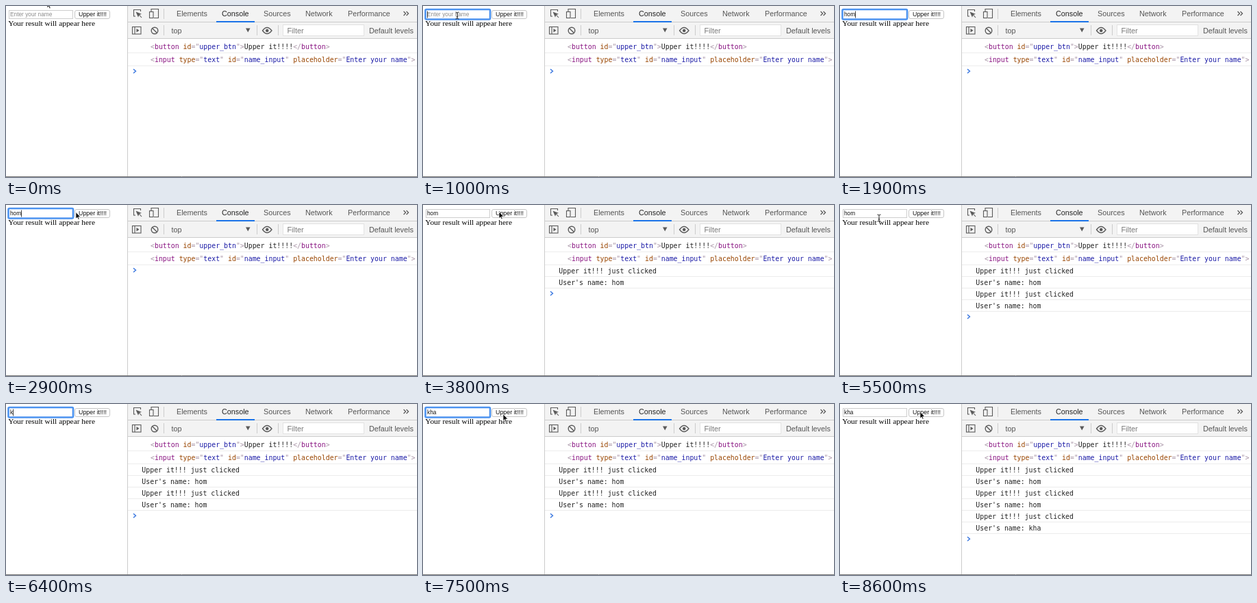
An HTML page that plays this animation: 600 px wide and 250 px high, repeating every 8.7 s.

```html
<!DOCTYPE html>
<html lang="en">
<head>
<meta charset="utf-8">
<title>Console demo</title>
<style>
  html, body { margin: 0; width: 100%; height: 100%; overflow: hidden; background: #fff; }
  svg { display: block; }
  text { white-space: pre; }
  .ui { font: 10.8px "Liberation Sans", Arial, sans-serif; fill: #555; }
  .form { font: 8.3px "Liberation Sans", Arial, sans-serif; fill: #111; }
  .page { font: 11.4px "Liberation Serif", Times, serif; fill: #000; }
  .code { font: 9.9px "DejaVu Sans Mono", monospace; fill: #222; }
  .on { fill: #222; }
  .tag { fill: #881280; }
  .attr { fill: #994500; }
  .val { fill: #1a1aa6; }
  .mark { fill: #a894a6; }
  .icon { fill: none; stroke: #5a5a5a; stroke-width: 1.1; }
  .rule { stroke: #ccc; }
  .row { stroke: #ececec; }
</style>
</head>
<body>
<svg width="600" height="250" viewBox="0 0 600 250">
  <rect width="600" height="250" fill="#fff"/>

  <!-- page -->
  <text class="page" x="3.3" y="29">Your result will appear here</text>
  <rect x="4.5" y="6.5" width="93" height="12" fill="#fff" stroke="#cdcdcd"/>
  <rect id="ring" x="3.5" y="5" width="94.5" height="14.5" rx="1.5" fill="#fff" stroke="#4c93f0" stroke-width="2.6"/>
  <rect id="selection" x="6" y="7.5" height="10" fill="#b3d7ff"/>
  <text id="field" class="form" x="6" y="15.4"></text>
  <rect id="caret" y="7.5" width="0.8" height="10" fill="#111"/>
  <rect x="100.5" y="6.5" width="51" height="12" rx="2.5" fill="#fff" stroke="#c6c6c6"/>
  <text class="form" x="106" y="15.4" style="font-size:8.9px">Upper it!!!!</text>

  <!-- toolbars -->
  <rect x="177" width="423" height="47" fill="#f3f3f3"/>
  <path class="rule" d="M177.5 0V249M177 23.5H600M177 47.5H600M230.5 4V19M230.5 28V43M366.5 28V43M397.5 28V43"/>
  <g class="ui">
    <text x="249" y="15">Elements</text>
    <text x="315" y="15" class="on">Console</text>
    <text x="376" y="15">Sources</text>
    <text x="437" y="15">Network</text>
    <text x="499" y="15">Performance</text>
    <text x="241.5" y="39.5">top</text>
    <text x="530" y="39.5">Default levels</text>
  </g>
  <rect x="307" y="22" width="56" height="2" fill="#1a73e8"/>
  <rect x="404.5" y="27.5" width="118" height="16" fill="#fff" stroke="#e2e2e2"/>
  <text class="ui" x="410.5" y="39.5" style="fill:#777">Filter</text>
  <g class="icon">
    <path d="M189 15H186.5V5.5H196.5V8"/>
    <path d="M189.5 8.5L198 11.8 194.5 13 193 16.5Z" fill="#5a5a5a" stroke="none"/>
    <path d="M194 12.5L198 17"/>
    <path d="M212 8V4.5H222.5V17.5H216"/>
    <rect x="209.5" y="8.5" width="5.5" height="9"/>
    <path d="M580.5 8L583.5 11 580.5 14M584.5 8L587.5 11 584.5 14" stroke-width="1.3"/>
    <rect x="184.5" y="30.5" width="12.5" height="10.5"/>
    <path d="M188 30.5V41"/>
    <path d="M190.5 33V38.5L194.5 35.75Z" fill="#5a5a5a" stroke="none"/>
    <circle cx="217" cy="36" r="4.8" stroke-width="1.4"/>
    <path d="M213.7 32.7L220.3 39.3" stroke-width="1.4"/>
    <path d="M350 32.5H356.5L353.2 38.5Z" fill="#5a5a5a" stroke="none"/>
    <path d="M374.5 36Q381 27 388 36Q381 45 374.5 36Z" stroke-width="1.3"/>
    <circle cx="381.2" cy="36" r="2.3" fill="#5a5a5a" stroke="none"/>
  </g>

  <!-- console -->
  <path class="row" d="M178 68.5H600M178 87.5H600"/>
  <text class="code" id="buttonLine" x="211" y="62.5"></text>
  <text class="code" id="inputLine" x="211" y="82"></text>
  <g id="logs"></g>
  <path id="prompt" d="M186 92.3L189.4 95.3 186 98.3" fill="none" stroke="#3b78e0" stroke-width="1.5"/>

  <path d="M0 249.5H600" stroke="#777"/>

  <!-- pointers -->
  <path id="arrow" d="M0 0V9.6L2.2 7.6 3.6 10.8 5.1 10.1 3.7 7H6.8Z" fill="#000" stroke="#fff" stroke-width="0.7"/>
  <path id="beam" d="M-2.5 -5Q0 -5 0 -3.5V3.5Q0 5 -2.5 5M2.5 -5Q0 -5 0 -3.5M0 3.5Q0 5 2.5 5M-1.3 1.8H1.3" fill="none" stroke="#111" stroke-width="0.9"/>
</svg>
<script>
const LOOP = 8700, STEP = 100, ROW = 17;
const FIRST = "hom", SECOND = "kha";
const $ = id => document.getElementById(id);
const show = (el, on) => el.setAttribute("visibility", on ? "visible" : "hidden");

// Console markup: [class, text] pairs
const attr = (name, value) => [["attr", " " + name], ["mark", '="'], ["val", value], ["mark", '"']];
const open = (tag, ...attrs) => [["mark", "<"], ["tag", tag], ...attrs.flat(), ["mark", ">"]];

function paint(line, parts) {
  line.innerHTML = "";
  for (const [cls, text] of parts) {
    const span = document.createElementNS("http://www.w3.org/2000/svg", "tspan");
    span.setAttribute("class", cls);
    span.textContent = text;
    line.append(span);
  }
}

paint($("buttonLine"), [
  ...open("button", attr("id", "upper_btn")),
  ["", "Upper it!!!!"],
  ["mark", "</"], ["tag", "button"], ["mark", ">"]
]);
paint($("inputLine"), open("input", attr("type", "text"), attr("id", "name_input"),
  attr("placeholder", "Enter your name")));

// Each click logs two rows
const clicks = [[3800, FIRST], [4700, FIRST], [7900, SECOND]];
const rows = clicks.flatMap(([at, name]) =>
  [[at, "Upper it!!! just clicked"], [at, "User's name: " + name]]);
$("logs").innerHTML = rows.map(([, text], i) =>
  `<g><text class="code" x="198.3" y="${99.6 + i * ROW}">${text}</text>` +
  `<path class="row" d="M178 ${104.5 + i * ROW}H600"/></g>`).join("");
const logs = [...$("logs").children];

// Time, text, mode of the input
const field = [
  [0, "", "idle"],
  [900, "", "edit"],
  [1400, FIRST.slice(0, 1), "edit"],
  [1600, FIRST.slice(0, 2), "edit"],
  [1900, FIRST, "edit"],
  [3700, FIRST, "idle"],
  [5700, FIRST, "edit"],
  [5800, FIRST, "select"],
  [6400, SECOND.slice(0, 1), "edit"],
  [6500, SECOND.slice(0, 2), "edit"],
  [6800, SECOND, "edit"],
  [7800, SECOND, "idle"]
];

// Time, x, y, pointer shape
const path = [
  [0, 60, -7, "arrow"], [100, 62, -14, ""],
  [400, 62, -6, "arrow"], [500, 60, 2, "arrow"], [600, 58, 9, "beam"],
  [900, 50, 14, "beam"], [1400, 50, 14, ""],
  [2400, 54, 14, "beam"], [2700, 88, 13, "beam"], [2800, 97, 11.5, "arrow"],
  [2900, 102, 10.5, "arrow"], [3200, 111, 10, "arrow"], [4800, 111, 10, "arrow"],
  [5000, 104, 12, "arrow"], [5100, 92, 16, "beam"], [5400, 57, 19, "beam"],
  [6400, 57, 19, ""], [6900, 57, 19, "beam"], [7200, 90, 17, "beam"],
  [7300, 101, 17, "arrow"], [7500, 117, 15, "arrow"], [7700, 117, 11.5, "arrow"],
  [LOOP, 117, 11.5, "arrow"]
];

const indexAt = (table, t) => table.findLastIndex(row => row[0] <= t);

function drawField(t) {
  const [since, text, mode] = field[indexAt(field, t)];
  const label = $("field");
  label.textContent = text || "Enter your name";
  label.style.fill = text ? "#111" : "#8a8a8a";
  const width = text ? label.getComputedTextLength() : 0;
  show($("ring"), mode !== "idle");
  show($("selection"), mode === "select");
  $("selection").setAttribute("width", width);
  $("caret").setAttribute("x", 6 + width);
  show($("caret"), mode === "edit" && (t - since) % 1000 < 500);
}

function drawPointer(t) {
  const i = indexAt(path, t);
  const [t0, x0, y0, shape] = path[i];
  const [t1, x1, y1] = path[i + 1];
  const k = (t - t0) / (t1 - t0);
  const place = `translate(${x0 + (x1 - x0) * k} ${y0 + (y1 - y0) * k})`;
  for (const id of ["arrow", "beam"]) {
    $(id).setAttribute("transform", place);
    show($(id), shape === id);
  }
}

function draw(t) {
  drawField(t);
  drawPointer(t);
  let count = 0;
  rows.forEach(([at], i) => {
    show(logs[i], t >= at);
    count += t >= at;
  });
  $("prompt").setAttribute("transform", `translate(0 ${count * ROW})`);
}

const start = performance.now();
let last = -1;
function tick() {
  const t = Math.floor(((performance.now() - start) % LOOP) / STEP) * STEP;
  if (t !== last) draw(last = t);
  requestAnimationFrame(tick);
}
tick();
</script>
</body>
</html>
```
